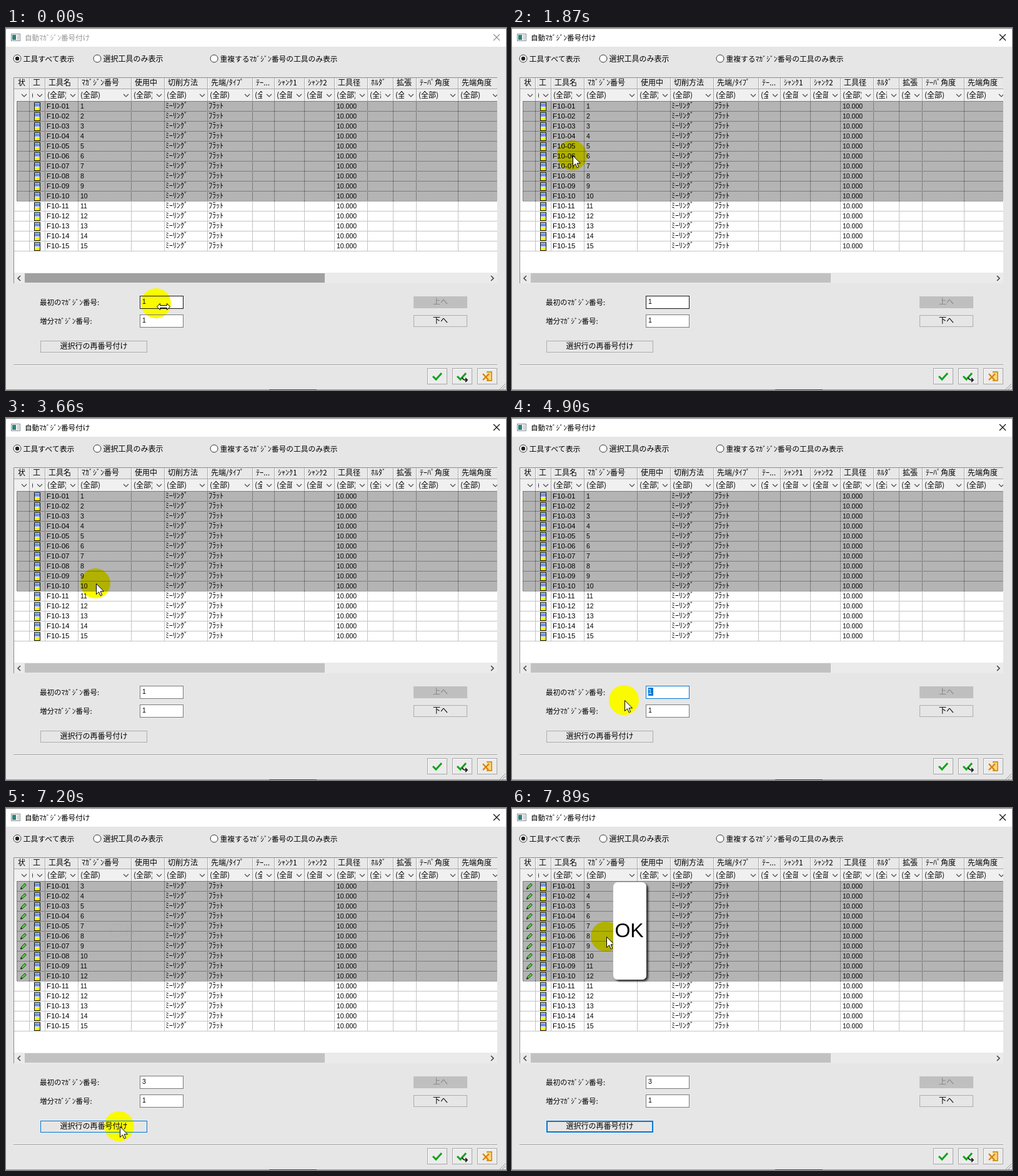
These frames come from a looping animation (800 by 580 pixels, 7990 ms). An HTML page:

```html
<!DOCTYPE html>
<html lang="ja">
<head>
<meta charset="utf-8">
<title>自動マガジン番号付け</title>
<style>
html, body { margin: 0; width: 100%; height: 100%; overflow: hidden; background: #e6e6e6; }
svg { display: block; }
text { font: 12px "Noto Sans CJK JP", "Noto Sans CJK", "Noto Sans", sans-serif; fill: #000; white-space: pre; }
.num { font: 10.5px "Liberation Sans", sans-serif; }
.name { font: 11.5px "Liberation Sans", sans-serif; }
.ok { font: 32px "Liberation Sans", sans-serif; text-anchor: middle; }
.mid { text-anchor: middle; }
</style>
</head>
<body>
<svg id="stage" width="800" height="580" viewBox="0 0 800 580"></svg>
<script>
const LOOP = 7990;
const stage = document.getElementById('stage');

const rect = (x, y, w, h, fill, more = '') =>
  `<rect x="${x}" y="${y}" width="${w}" height="${h}" fill="${fill}" ${more}/>`;
const box = (x, y, w, h, fill, stroke, more = '') =>
  rect(x + .5, y + .5, w - 1, h - 1, fill, `stroke="${stroke}" ${more}`);
const path = (d, stroke, more = '') => `<path d="${d}" fill="none" stroke="${stroke}" ${more}/>`;
const text = (x, y, s, more = '') => `<text x="${x}" y="${y}" ${more}>${s}</text>`;
const group = (x, y, body, more = '') => `<g transform="translate(${x} ${y})" ${more}>${body}</g>`;

// Table geometry
const TOP = 117, ROW = 16, ROWS = 15, PICKED = 10;
const MID = TOP + PICKED * ROW, END = TOP + ROWS * ROW;
const edges = [13, 37, 62, 115, 200, 253, 322, 394, 429, 477, 525, 578, 619, 656, 723, 791];
const heads = ['状', '工', '工具名', 'ﾏｶﾞｼﾞﾝ番号', '使用中', '切削方法', '先端/ﾀｲﾌﾟ', 'ﾃｰ...',
  'ｼｬﾝｸ1', 'ｼｬﾝｸ2', '工具径', 'ﾎﾙﾀﾞ', '拡張', 'ﾃｰﾊﾟ角度', '先端角度'];

// Dotted lines light every other pixel of one shared checkerboard
const dotsDown = x => path(`M${x + .5} ${TOP + (x + TOP + 1) % 2}V${MID}`, '#444', 'stroke-dasharray="1 1"');
const dotsAcross = y => path(`M${17 + (17 + y + 1) % 2} ${y + .5}H787`, '#444', 'stroke-dasharray="1 1"');

function headCell(label, i) {
  const x = edges[i], right = edges[i + 1];
  return text(x + 6, 92, label) +
    `<svg x="${x + 4}" y="98" width="${right - x - 23}" height="19">${text(0, 14, '(全部)')}</svg>` +
    path(`M${right - 12} 106l4 4 4-4`, '#444', 'stroke-width="1.1"') +
    path(`M${right + .5} 80V117`, '#a8a8a8') +
    path(`M${right + 1.5} 80V97`, '#fff');
}

function toolIcon(y) {
  return box(45, y + 2, 10, 14, '#ffff00', '#111') + rect(46, y + 3, 8, 6, '#6f97ea') +
    rect(46, y + 3, 8, 1, '#c8dcff') + rect(46, y + 9, 8, 1, '#fff');
}

function row(i) {
  const y = TOP + i * ROW, base = y + 12;
  const pen = i < PICKED ? group(28, y + 8,
    path('M-4.5 5l1-3.6 5.5-5.5 2.4 2.4-5.5 5.5z', '#123f12', 'style="fill:#62c24e"') +
    path('M-4.5 5l2-2', '#123f12', 'stroke-width="2"'), 'class="pen"') : '';
  return toolIcon(y) + pen +
    text(65, base, 'F10-' + String(i + 1).padStart(2, '0'), 'class="name"') +
    text(119, base, i + 1, 'class="num mag"') +
    text(255, base, 'ﾐｰﾘﾝｸﾞ') + text(324, base, 'ﾌﾗｯﾄ') +
    text(529, base, '10.000', 'class="num"');
}

const tableBack = () =>
  rect(12, 79, 774, 330, '#fff') + rect(13, 79, 773, 18, '#e8e8e8') + rect(13, 98, 773, 19, '#f0f0f0');

function tableInk() {
  let s = path('M13 97.5H787', '#a8a8a8') + heads.map(headCell).join('') + dotsDown(17);
  for (const x of edges.slice(1)) s += dotsDown(x) + path(`M${x + .5} ${MID}V${END}`, '#c4c4c4');
  for (let i = 0; i <= ROWS; i++) {
    const y = TOP + i * ROW;
    s += i <= PICKED ? dotsAcross(y) : path(`M13 ${y + .5}H787`, '#c4c4c4');
  }
  for (let i = 0; i < ROWS; i++) s += row(i);
  s += rect(13, 392, 774, 17, '#ebebeb') + rect(30, 393, 480, 15, '#c1c1c1', 'id="thumb"');
  s += path('M23 397l-4 4 4 4M776 397l4 4-4 4', '#444', 'stroke-width="1.6"');
  return `<svg x="12" y="78" width="774" height="332" viewBox="12 78 774 332">${s}` +
    path('M12.5 409V79.5H786', '#8c8c8c') + '</svg>';
}

function radio(x, label, size, on) {
  return `<circle cx="${x}" cy="49" r="6" fill="#fff" stroke="#333"/>` +
    (on ? `<circle cx="${x}" cy="49" r="3.2" fill="#222"/>` : '') +
    text(x + 9.5, 54, label, `style="font-size:${size}px"`);
}

const button = (x, y, w, label, fill, stroke, ink, more = '') =>
  box(x, y, w, 19, fill, stroke, more) +
  text(x + w / 2, y + 13, label, `class="mid" style="fill:${ink}"`);

function iconButton(x, body) {
  return box(x, 545, 32, 26, '#ececec', '#a6a6a6') + path(`M${x + 1.5} 570V546.5H${x + 31}`, '#fff') +
    group(x + 16, 558, body);
}

const tick = x => path(`M${x - 7} 0l5 5 9-10`, '#12a41c', 'stroke-width="3"');

function frame() {
  return rect(0, 0, 800, 580, '#e6e6e6') + rect(0, 0, 800, 30, '#fff') + path('M0 .5H800', '#777') +
    box(8, 9, 15, 12, '#f4f4f4', '#8a8f94') + rect(10, 11, 6, 8, '#2f8278') + rect(18, 11, 3, 8, '#c9d2d8') +
    text(30, 20, '自動ﾏｶﾞｼﾞﾝ番号付け', 'id="title" style="font-size:11.6px"') +
    path('M780 10l10 10M790 10l-10 10', '#000', 'id="close" stroke-width="1.1"') +
    radio(18, '工具すべて表示', 11.9, true) + radio(146, '選択工具のみ表示', 12, false) +
    radio(333, '重複するﾏｶﾞｼﾞﾝ番号の工具のみ表示', 11.75, false);
}

const fieldBack = () => rect(214, 429, 70, 21, '#fff') + rect(214, 459, 70, 21, '#fff');

function footer() {
  const door = path('M-1-7H7V7H-1', '#c87a00', 'style="fill:#ffd878" stroke-width="1.4"') +
    path('M-7-4L2 6M3-4L-7 6', '#d98200', 'stroke-width="2.4"');
  const curl = path('M0 2c1 4 4 4 7 4M5 3l3 3-3 3', '#222', 'stroke-width="1.8"');
  return text(54, 444, '最初のﾏｶﾞｼﾞﾝ番号:', 'style="font-size:11.5px"') +
    text(54, 474, '増分ﾏｶﾞｼﾞﾝ番号:', 'style="font-size:11.5px"') +
    box(214, 429, 70, 21, 'none', '#7a7a7a', 'id="field"') + box(214, 459, 70, 21, 'none', '#7a7a7a') +
    rect(218, 432, 8, 13, '#0078d7', 'id="mark"') + text(218, 442, '1', 'class="num" id="first"') +
    text(218, 472, '1', 'class="num"') + rect(224, 432, 1, 12, '#000', 'id="caret"') +
    button(652, 430, 86, '上へ', '#bfbfbf', '#bfbfbf', '#868686') +
    button(652, 460, 86, '下へ', '#e6e6e6', '#adadad', '#000') +
    button(55, 501, 171, '選択行の再番号付け', 'none', '#adadad', '#000', 'id="apply"') +
    rect(56, 502, 169, 17, 'none', 'id="ring" stroke="#0078d7" stroke-width="2"') +
    path('M12 539.5H786', '#9c9c9c') + path('M12 540.5H786', '#fff') +
    iconButton(674, tick(0)) + iconButton(714, tick(-1) + curl) + iconButton(754, door) +
    path('M790 579l9-9M794 579l5-5', '#9a9a9a') + path('M0 579.5H800', '#999') + path('M421 579.5H497', '#444');
}

const arrow = '<path id="arrow" d="M0 0V17L4 13.2L6.7 19.3L9.2 18.2L6.6 12.3H12Z" fill="#fff" stroke="#000"/>';
const resize = '<path id="resize" d="M0 5l5-5v3h11V0l5 5-5 5V7H5v3z" fill="#fff" stroke="#000"/>';

// Backgrounds, halo, selection tint, then ink on top
stage.innerHTML = `<defs><filter id="shade" x="-30%" y="-10%" width="170%" height="125%">
  <feDropShadow dx="3" dy="2.5" stdDeviation="1.5" flood-color="#000" flood-opacity=".75"/></filter></defs>` +
  frame() + tableBack() + fieldBack() +
  '<circle id="halo" r="24" fill="#fafa00"/>' +
  rect(17, TOP, 769, PICKED * ROW, '#000', 'fill-opacity=".294"') +
  tableInk() + footer() +
  `<g id="pointer">${arrow}${resize}</g>` +
  '<g id="note">' + rect(162, 119, 53, 156, '#fff', 'id="card" rx="7" filter="url(#shade)"') +
  text(187.5, 207, 'OK', 'class="ok"') + '</g>';

const put = (el, name, value) => el.setAttribute(name, value);
const show = (el, on) => put(el, 'visibility', on ? 'visible' : 'hidden');
const ui = {};
for (const el of stage.querySelectorAll('[id]')) ui[el.id] = el;
const pens = stage.querySelectorAll('.pen');
const mags = stage.querySelectorAll('.mag');

const ramp = (t, a, b) => Math.min(1, Math.max(0, (t - a) / (b - a)));
const mix = (a, b, k) => `rgb(${a.map((v, i) => Math.round(v + (b[i] - v) * k))})`;
const gray = v => [v, v, v];
const BLUE = [0, 120, 215];

// Pointer path: time, x, y
const keys = [[0, 240, 441], [1000, 240, 441], [1400, 165, 335], [1780, 100, 235], [1870, 96, 204],
  [2130, 105, 136], [2340, 188, 150], [2590, 150, 220], [2860, 143, 265], [3660, 143, 265],
  [4380, 237, 438], [4480, 237, 438], [4900, 179, 452], [5460, 179, 452], [6120, 181, 510],
  [7410, 181, 510], [7890, 150, 206], [LOOP, 150, 206]];

const still = (a, b) => !a || !b || (a[1] === b[1] && a[2] === b[2]);

function slope(i, d) {
  const a = keys[i - 1], b = keys[i], c = keys[i + 1];
  return still(a, b) || still(b, c) ? 0 : (c[d] - a[d]) / (c[0] - a[0]);
}

function pointerAt(t) {
  let i = 0;
  while (i < keys.length - 2 && t >= keys[i + 1][0]) i++;
  const a = keys[i], b = keys[i + 1], span = b[0] - a[0], u = (t - a[0]) / span, v = 1 - u;
  return [1, 2].map(d => Math.round(
    a[d] * (1 + 2 * u) * v * v + b[d] * u * u * (3 - 2 * u) +
    span * u * v * (slope(i, d) * v - slope(i + 1, d) * u)));
}

function fieldColor(t) {
  if (t < 4300) return mix(gray(23), gray(122), ramp(t, 2620, 2860));
  if (t < 6810) return mix(gray(23), BLUE, ramp(t, 4340, 4480));
  return mix(BLUE, gray(122), ramp(t, 6810, 6940));
}

function draw(t) {
  const [x, y] = pointerAt(t);
  const inField = x > 214 && x < 284 && y > 429 && y < 450;
  put(ui.halo, 'cx', x);
  put(ui.halo, 'cy', y);
  put(ui.pointer, 'transform', `translate(${x + 1.5} ${y + .5})`);
  show(ui.arrow, !inField);
  show(ui.resize, inField);

  const active = ramp(t, 60, 270);
  ui.title.style.fill = mix(gray(150), gray(0), active);
  put(ui.close, 'stroke', mix(gray(140), gray(0), active));
  put(ui.thumb, 'fill', mix(gray(160), gray(193), ramp(t, 1030, 1400)));

  const marked = t >= 4640 && t < 5460;
  put(ui.field, 'stroke', fieldColor(t));
  show(ui.mark, marked);
  ui.first.textContent = t < 5460 ? '1' : '3';
  ui.first.style.fill = marked ? '#fff' : '#000';
  show(ui.caret, (t >= 5460 && t < 5860) || (t >= 6380 && t < 6580));

  const over = x > 55 && x < 226 && y > 501 && y < 520;
  put(ui.apply, 'stroke', over ? '#0078d7' : '#adadad');
  show(ui.ring, t >= 6580 && !over);

  const done = t >= 7170;
  pens.forEach(p => show(p, done));
  mags.forEach((m, i) => { m.textContent = i + (done && i < PICKED ? 3 : 1); });

  const k = ramp(t, 7200, 7700);
  put(ui.note, 'opacity', Math.min(1, k * 2));
  put(ui.card, 'fill', mix(gray(180), gray(255), k ** 3));
}

function tickFrame() {
  draw(performance.now() % LOOP);
  requestAnimationFrame(tickFrame);
}
tickFrame();
</script>
</body>
</html>
```
